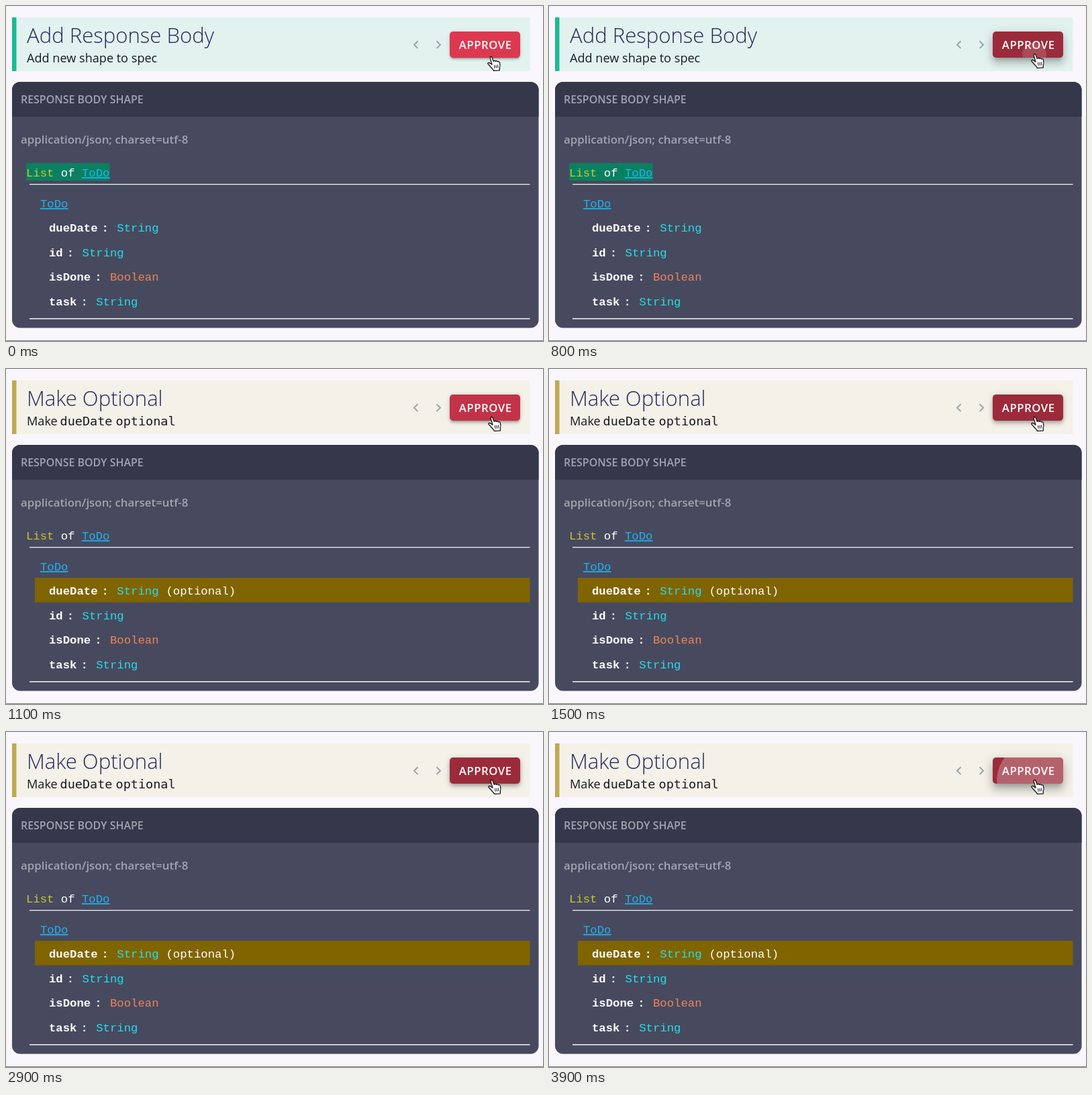
These frames come from a looping animation (800 by 499 pixels, 4 s). An HTML page:

```html
<!DOCTYPE html>
<html lang="en">
<head>
<meta charset="utf-8">
<title>Approve changes</title>
<style>
  html, body { margin: 0; width: 100%; height: 100%; overflow: hidden; background: #f9f7fc; }
  body { position: relative; font-family: "Open Sans", "Noto Sans", sans-serif; }
  svg { position: absolute; left: 0; top: 0; }
  .title { font-size: 31.1px; font-weight: 340; fill: #25295c; }
  .sub { font-size: 18.1px; font-weight: 370; fill: #181a20; }
  .mono { font: 18.5px "DejaVu Sans Mono", monospace; }
  .label { font-weight: 600; fill: #a2a4b0; }
  .code { font: 17.3px "Liberation Mono", monospace; fill: #fff; }
  .key { font-weight: bold; }
  .list { fill: #cbc42e; }
  .link { fill: #1fb2f0; text-decoration: underline; }
  .String { fill: #25dde9; }
  .Boolean { fill: #f08358; }
  .chevron { fill: none; stroke: #9da6a9; stroke-width: 2; }
  #button {
    position: absolute; left: 661px; top: 38px; width: 105px; height: 39px;
    border-radius: 5px; overflow: hidden; color: #fff;
    font-size: 16.8px; font-weight: 600; line-height: 40px;
    letter-spacing: .48px; text-align: center;
  }
  #button b { position: relative; left: .7px; font-weight: inherit; }
  #ripple {
    position: absolute; left: -10px; top: -38px; width: 144px; height: 144px;
    border-radius: 50%; background: #fff;
  }
</style>
</head>
<body>
<svg width="800" height="499" viewBox="0 0 800 499">
  <g id="add">
    <path d="M9 17H780.500V97H9z" fill="#e2f2ef"/>
    <path d="M9 17h6.500v80H9z" fill="#1cba94"/>
    <text class="title" x="31" y="55">Add Response Body</text>
    <text class="sub" x="31" y="83.5">Add new shape to spec</text>
  </g>
  <g id="optional">
    <path d="M9 17H780.500V97H9z" fill="#f3f1e8"/>
    <path d="M9 17h6.500v80H9z" fill="#c0a853"/>
    <text class="title" x="31" y="55">Make Optional</text>
    <text class="sub" x="31" y="83.5">Make <tspan class="mono" x="80.5">dueDate</tspan><tspan class="mono" x="163.5">optional</tspan></text>
  </g>
  <path class="chevron" d="M613.5 52.3l-5.5 5.4 5.5 5.4M641.5 52.3l5.5 5.4-5.5 5.4"/>

  <rect x="9" y="113" width="784.5" height="366.5" rx="12" fill="#474a5e"/>
  <path d="M9 165V125a12 12 0 0 1 12-12H781.500a12 12 0 0 1 12 12V165z" fill="#35374b"/>
  <text class="label" x="22" y="145" font-size="15.95">RESPONSE BODY SHAPE</text>
  <text class="label" x="22" y="205" font-size="16.9">application/json; charset=utf-8</text>
  <path id="addMark" d="M30 234H154.500V260H30z" fill="#0a8060"/>
  <path id="optionalMark" d="M43 311H780.500V347.500H43z" fill="#806400"/>
  <path d="M35 265.600H780.500M35 465.800H780.500" stroke="#f4f4f6" stroke-width="1.4"/>
  <text class="code" x="30" y="254"><tspan class="list">List</tspan> of <tspan class="link">ToDo</tspan></text>
  <text class="code link" x="51" y="300">ToDo</text>
  <g id="rows" class="code"></g>
  <text id="note" class="code" x="238.5" y="336">(optional)</text>
  <path d="M0 498.500H800" stroke="#77777d"/>
</svg>
<div id="button"><span id="ripple"></span><b>APPROVE</b></div>
<svg width="800" height="499" viewBox="0 0 800 499">
  <g id="cursor" stroke="#111" stroke-width="1.3" stroke-linejoin="round" stroke-linecap="round">
    <path fill="#fff" d="M4.200 3.200C3.600 1.300 6 .2 7 2.200L9.300 8C9.600 6.600 11.700 6.500 12.300 8.200 12.800 7 14.800 7 15.300 8.800 16 7.800 17.800 8 18.300 9.800 19.400 13 19.500 15 18.300 18V21.500L9.500 22C9 19.500 5 17 3.600 14.800 2.600 13 .6 12.400.7 11.200 1 9.800 3.500 9.600 5 11.500L7 12.700z"/>
    <path fill="none" stroke-width="1" d="M10.500 14l.6 4M13 13.700l.5 4M15.500 13.400l.4 4"/>
  </g>
</svg>
<script>
const $ = id => document.getElementById(id);
const LOOP = 4000, STEP = 100, SWITCH = 1100;
const fields = [["dueDate", "String"], ["id", "String"], ["isDone", "Boolean"], ["task", "String"]];

$("rows").innerHTML = fields.map(([name, type], i) =>
  `<text x="64" y="${336 + i * 36.6}"><tspan class="key">${name}</tspan>` +
  `<tspan class="key" dx="6">:</tspan><tspan class="${type}" dx="12.4">${type}</tspan></text>`).join("");

// Each shadow layer: y offset, blur, spread, opacity
const SHADOW_SCALE = 1.2;
const REST = [[3, 1, -2, .2], [2, 2, 0, .14], [1, 5, 0, .12]];
const HOVER = [[2, 4, -1, .2], [4, 5, 0, .14], [1, 10, 0, .12]];
const PRESSED = [[5, 5, -3, .2], [8, 10, 1, .14], [3, 14, 2, .12]];

const mix = (a, b, k) => a + (b - a) * k;
const mixAll = (a, b, k) => a.map((v, i) => mix(v, b[i], k));
const mixShadow = (a, b, k) => a.map((layer, i) => mixAll(layer, b[i], k));

// cubic-bezier(.4, 0, .2, 1), solved by bisection
function ease(x) {
  x = Math.min(1, Math.max(0, x));
  let lo = 0, hi = 1;
  for (let i = 0; i < 20; i++) {
    const u = (lo + hi) / 2, v = 1 - u;
    if (1.2 * v * v * u + .6 * v * u * u + u ** 3 < x) lo = u; else hi = u;
  }
  return 3 * (1 - lo) * lo * lo + lo ** 3;
}

function draw(t) {
  const second = t >= SWITCH;
  const hover = ease((t - (second ? 1020 : -20)) / 250);
  const sincePress = t - (second ? 3625 : 660);
  const press = ease(sincePress / 250), grow = ease(sincePress / 550);

  for (const id of ["add", "addMark"]) $(id).style.display = second ? "none" : "";
  for (const id of ["optional", "optionalMark", "note"]) $(id).style.display = second ? "" : "none";

  const shadow = mixShadow(mixShadow(REST, HOVER, hover), PRESSED, press);
  $("button").style.background = `rgb(${mixAll([222, 56, 80], [155, 43, 58], hover)})`;
  $("button").style.boxShadow = shadow.map(([y, blur, spread, alpha]) =>
    `0 ${[y, blur, spread].map(v => v * SHADOW_SCALE + "px").join(" ")} rgba(0,0,0,${alpha})`).join();
  $("ripple").style.transform = `scale(${grow})`;
  $("ripple").style.opacity = sincePress > 0 ? mix(.1, .3, grow) : 0;

  const move = ease(t / 250);
  $("cursor").setAttribute("transform", `translate(${mix(717, 718, move)} ${mix(74.4, 70.4, move)})`);
}

function tick(now) {
  draw(Math.floor(now % LOOP / STEP) * STEP);
  requestAnimationFrame(tick);
}
draw(0);
requestAnimationFrame(tick);
</script>
</body>
</html>
```
